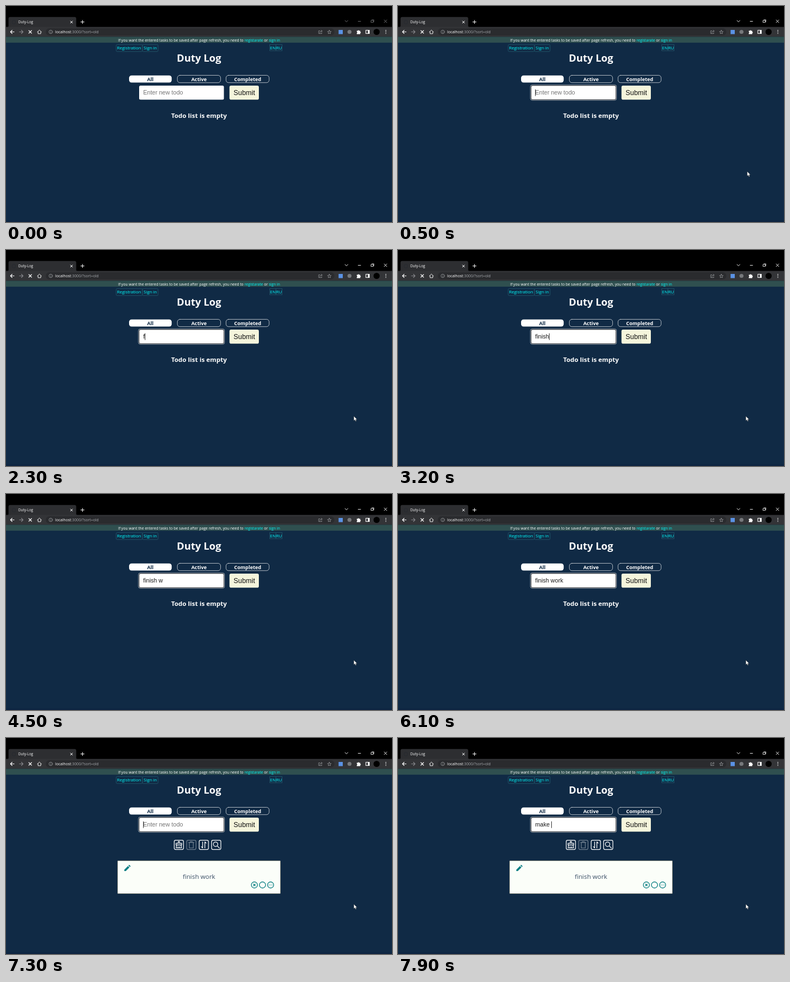
These frames come from a looping animation (690 px wide and 388 px high, 8 s). An HTML page:

```html
<!DOCTYPE html>
<html lang="en">
<head>
<meta charset="utf-8">
<title>Duty-Log</title>
<style>
html, body { margin: 0; width: 100%; height: 100%; overflow: hidden; background: #000; }
svg { display: block; width: 690px; height: 388px; }
text { font-family: "Open Sans", "Noto Sans", sans-serif; fill: #fff; white-space: pre; }
.b { font-weight: 700; }
.s { font-weight: 500; }
.m { text-anchor: middle; }
.f { font-family: "Liberation Sans", Arial, sans-serif; }
.link { fill: #0ff; }
.line { fill: none; stroke: #fff; stroke-linecap: round; stroke-linejoin: round; }
.teal { fill: none; stroke: #0a7f83; stroke-width: 1.3; }
</style>
</head>
<body>
<svg viewBox="0 0 690 388">
  <!-- browser -->
  <rect width="690" height="388"/>
  <path d="M2 38q2.500 0 2.500-2.500V22.700q0-3 3-3H122.500q3 0 3 3v12.800q0 2.500 2.500 2.500z" fill="#2d2e31"/>
  <rect y="37.600" width="690" height="18" fill="#333437"/>
  <rect x="71" y="40" width="516" height="13" rx="6.500" fill="#2a2b2e"/>
  <circle cx="14" cy="29" r="3.300" fill="none" stroke="#262a30"/>
  <text class="s" x="22" y="31.200" font-size="6.300">Duty-Log</text>
  <path class="line" d="M115.200 27l3.800 3.800m0-3.800l-3.800 3.800M133.700 28.700h6m-3-3v6"/>
  <g id="controls" class="line" stroke-width=".9">
    <path d="M606 26l2.600 2.600 2.600-2.600M629.500 27.500h4.500M676 25l4.800 4.800m0-4.800l-4.800 4.800"/>
    <path d="M652.800 26h3.600v3.600h-3.600zM654 24.800h3.600v3.600" stroke-width=".8"/>
  </g>
  <g class="line" stroke-width="1.100">
    <path d="M14.500 46.500H8m3-3l-3 3 3 3"/>
    <path d="M24 46.500h6.500m-3-3l3 3-3 3" stroke="#85868a"/>
    <path d="M40.800 44l5 5m0-5l-5 5"/>
    <path d="M56 46.700l3.700-3.500 3.700 3.500M57.300 46.300v3.500h4.800v-3.500" stroke-width=".9"/>
    <g stroke="#a4a6aa" stroke-width=".7">
      <circle cx="80" cy="46.500" r="3.200"/>
      <path d="M80 46.300v1.800M80 44.800v.1M561 44.500h-2v5h5.500v-1.500M561 48q0-3 4-3m-1.500-1.500l1.700 1.500-1.700 1.600M578 43.500l.9 2.200 2.400.2-1.800 1.600.5 2.400-2-1.300-2 1.300.5-2.400-1.800-1.600 2.400-.2z"/>
    </g>
    <path d="M643.300 43.500h6.200v6h-6.200z"/>
  </g>
  <text x="88" y="49" font-size="6.800">localhost<tspan fill="#a5a8ac">:3000/?sort=old</tspan></text>
  <rect x="594.500" y="43" width="7.500" height="7.500" fill="#5b92e5"/>
  <circle cx="614" cy="46.500" r="3.600" fill="#77797c"/>
  <path d="M627 44.500h2a1.100 1.100 0 1 1 2.200 0h2v2a1.100 1.100 0 1 1 0 2.200v1.800h-6.200v-1.900a1 1 0 1 0 0-2.100z" fill="#fff"/>
  <path d="M646.800 43.500h2.700v6h-2.700z" fill="#fff"/>
  <circle cx="662.500" cy="46.500" r="5.500"/>
  <path d="M679 43.800v.1m0 2.600v.1m0 2.600v.1" class="line" stroke-width="1.500"/>

  <!-- page -->
  <rect y="55.400" width="690" height="333" fill="#102a45"/>
  <rect y="385.500" width="690" height="2.500" fill="#0d2340"/>
  <rect y="55.400" width="690" height="10.500" fill="#2f4f4f"/>
  <text class="m s" x="345" y="63.700" font-size="6.650">If you want the entered tasks to be saved after page refresh, you need to <tspan class="link">registarate</tspan> or <tspan class="link">sign in</tspan></text>
  <g fill="none" stroke="#23566a" stroke-width=".9">
    <rect x="197" y="69.300" width="46.800" height="12.500" rx="1.500"/>
    <rect x="243.800" y="69.300" width="28" height="12.500" rx="1.500"/>
    <rect x="471.500" y="69.300" width="11" height="11"/>
    <rect x="482.500" y="69.300" width="11" height="11"/>
  </g>
  <g class="s" font-size="7.700">
    <text class="link" x="198.500" y="78.300">Registration</text>
    <text class="link" x="246" y="78.300">Sign in</text>
    <text class="link" x="472" y="78.100">EN</text>
    <text class="link" x="482.700" y="78.100">RU</text>
  </g>
  <text class="b m" x="345" y="99.700" font-size="18">Duty Log</text>

  <rect x="220" y="124.700" width="76.200" height="12.800" rx="4.500" fill="#fff"/>
  <rect class="line" x="306.300" y="124.500" width="77.300" height="13.200" rx="4.500" stroke-width=".65"/>
  <rect class="line" x="393.300" y="124.500" width="77" height="13.200" rx="4.500" stroke-width=".65"/>
  <g class="b m" font-size="8.950">
    <text x="258" y="134.600" style="fill:#102a45">All</text>
    <text x="345" y="134.600">Active</text>
    <text x="432" y="134.600">Completed</text>
  </g>

  <rect x="238" y="143" width="151.500" height="25.200" rx="2.500" fill="#fff"/>
  <g id="ring" fill="none">
    <rect x="236.900" y="141.900" width="153.600" height="27.300" rx="3" stroke="#fff" stroke-width=".7"/>
    <rect x="237.800" y="142.800" width="151.800" height="25.500" rx="2.300" stroke="#242529" stroke-width=".9"/>
  </g>
  <text id="entry" class="f" x="245.200" y="159.400" font-size="10.600"></text>
  <rect id="caret" y="149.700" width=".9" height="12" fill="#222"/>
  <rect x="399.500" y="143" width="52.500" height="25.200" rx="2.800" fill="#f5f5dc"/>
  <text class="f m" x="426" y="160" font-size="12.300" style="fill:#111">Submit</text>

  <text id="empty" class="b m" x="345" y="201.400" font-size="11.450">Todo list is empty</text>

  <g id="list">
    <g class="line" stroke-width="1.200">
      <g id="tools"></g>
      <path d="M308 185.800h2v3.400h4v3h-10v-3h4zM305 192.200l-.8 5.300h9.600l-.8-5.300M307.500 197v-2m3 2v-2"/>
      <path d="M326.500 187.700h9.400m-6.400 0v-1.700h3.400v1.700m-5.300 0v9.800h7.200v-9.800" opacity=".4"/>
      <path d="M351.500 186.500v11l-2.300-2.300M355.500 197.500v-11l2.300 2.300"/>
      <circle cx="374.600" cy="190.800" r="4"/>
      <path d="M377.600 193.800l4 4"/>
    </g>
    <rect x="199.500" y="220.500" width="291" height="59" rx="1" fill="#fbfef9" stroke="#85897f"/>
    <path d="M211.500 239v-2.600l6.500-6.500 2.600 2.600-6.500 6.500zM218.800 229.100l1.400-1.300 2.600 2.500-1.400 1.400z" fill="#0a7f83"/>
    <text class="m" x="345" y="253.400" font-size="11.350" style="fill:#3b4f66">finish work</text>
    <g class="teal">
      <circle cx="444" cy="264" r="5.500"/>
      <circle cx="458.500" cy="264" r="5.500"/>
      <circle cx="473" cy="264" r="5.500"/>
      <path d="M442 262l4 4m0-4l-4 4"/>
      <path d="M470.300 264v.01m2.700-.01v.01m2.700-.01v.01" stroke-linecap="round"/>
    </g>
  </g>
  <path id="mouse" d="M0 0V8.200L1.900 6.500 3.100 9.300 4.500 8.700 3.300 6H5.800Z" fill="#fff" stroke="#111" stroke-width=".4"/>
</svg>
<script>
const LOOP = 8000;
const $ = id => document.getElementById(id);
const [controls, ring, entry, caret, empty, list, mouse] =
  ["controls", "ring", "entry", "caret", "empty", "list", "mouse"].map($);

// [time, entry text, caret shown]
const steps = [
  [0, "", 0], [400, "", 1], [1000, "", 0], [1500, "", 1], [2000, "", 0],
  [2300, "f", 1], [2500, "fin", 1], [2700, "fini", 1], [3000, "finis", 1],
  [3100, "finish", 1], [3300, "finish ", 1], [3800, "finish ", 0],
  [4000, "finish w", 1], [4500, "finish w", 0], [4900, "finish wo", 1],
  [5000, "finish wor", 1], [5200, "finish work", 1], [5800, "finish work", 0],
  [6200, "", 0], [6900, "m", 1], [7000, "ma", 1], [7300, "", 1],
  [7500, "m", 1], [7600, "ma", 1], [7700, "mak", 1], [7800, "make", 1], [7900, "make ", 1]
];

$("tools").innerHTML = [309, 331.3, 353.6, 375.8].map((x, i) =>
  `<rect x="${x - 8.3}" y="183.700" width="16.600" height="16.600" rx="2.500" opacity="${i === 1 ? .4 : 1}"/>`).join("");

const show = (el, on) => el.style.visibility = on ? "visible" : "hidden";

function draw(t) {
  const [, text, blink] = steps.findLast(s => s[0] <= t);
  const active = t >= 400, added = t >= 6200;
  controls.style.stroke = active ? "#fff" : "#77787a";
  show(ring, active);
  show(mouse, active);
  show(empty, !added);
  show(list, added);

  entry.textContent = text || "Enter new todo";
  entry.style.fill = text ? "#1b1b1b" : "#757575";
  const width = text ? entry.getComputedTextLength() : 0;
  caret.setAttribute("x", 245.2 + width);
  show(caret, blink);

  const move = Math.min(1, Math.max(0, Math.floor(t / 100 - 5) / 2));
  mouse.setAttribute("transform", `translate(${624.2 - 2.4 * move} ${297.2 + 1.2 * move})`);
}

function tick() {
  draw(performance.now() % LOOP);
  requestAnimationFrame(tick);
}
tick();
</script>
</body>
</html>
```
